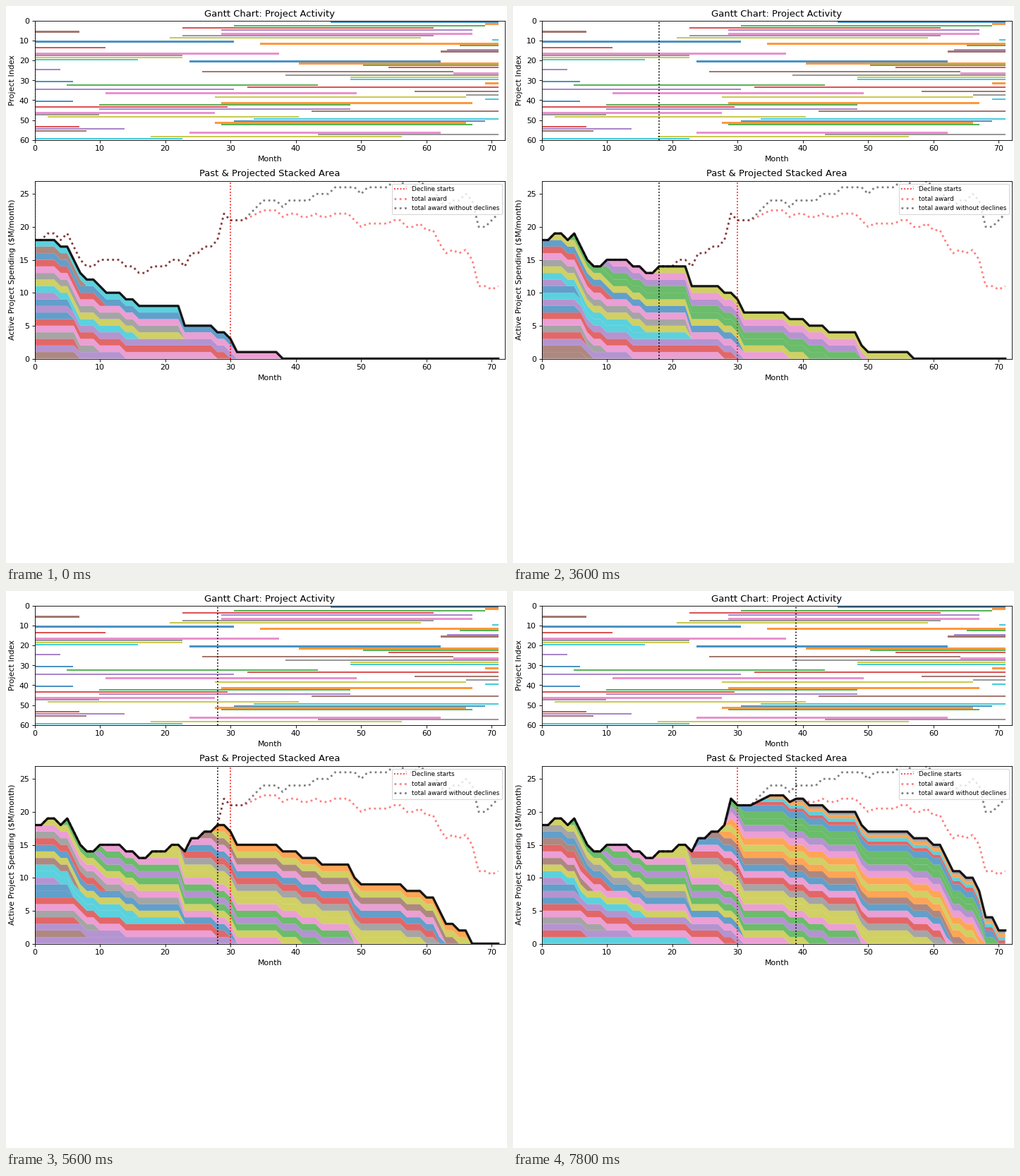
Write a matplotlib script that moves like this. It is 710 px wide and 789 px high and loops after 8 s.

```python
import numpy as np
import matplotlib.pyplot as plt
from matplotlib.animation import FuncAnimation

W, H, DPI = 710, 789, 78.9
MONTHS, SPAN, DECLINE = 72, 39, 30

# First month of each project; every project lasts SPAN months.
STARTS = [
    46, 70, 31, 23, 29, -32, 29, 23, 21, 71,
    -8, 35, 66, -28, 64, 63, -1, -16, -16, -23,
    24, 41, 51, 55, -35, 26, 65, 39, 49, 49,
    -33, 70, 5, 33, -8, 59, 11, 67, 28, 70,
    -33, 29, 10, -9, 10, 43, -11, -29, 2, 34,
    31, 28, 29, -32, -25, -31, 24, 44, 18, -16,
]
COLORS = [f"C{i % 10}" for i in range(len(STARTS))]
first = [max(s, 0) for s in STARTS]
months = np.arange(MONTHS)

active = np.array([(months >= s) & (months < s + SPAN) for s in STARTS], float)
weight = np.where(np.array(STARTS) > DECLINE + 1, 0.5, 1.0)
spending = active * weight[:, None]


def stack_order(ids):
    """Unstable median-of-three quicksort of project ids by first month."""
    a = list(ids)

    def key(i):
        return first[a[i]]

    def swap(i, j):
        a[i], a[j] = a[j], a[i]

    parts = [(0, len(a) - 1)]
    while parts:
        lo, hi = parts.pop()
        if hi - lo <= 16:
            a[lo:hi + 1] = sorted(a[lo:hi + 1], key=lambda p: first[p])
            continue
        mid = lo + (hi - lo) // 2
        if key(mid) < key(lo):
            swap(mid, lo)
        if key(hi) < key(mid):
            swap(hi, mid)
        if key(mid) < key(lo):
            swap(mid, lo)
        pivot = key(mid)
        i, j = lo, hi - 1
        swap(mid, j)
        while True:
            i += 1
            while key(i) < pivot:
                i += 1
            j -= 1
            while pivot < key(j):
                j -= 1
            if i >= j:
                break
            swap(i, j)
        swap(i, hi - 1)
        parts += [(lo, i - 1), (i + 1, hi)]
    return a


def add_axes(top, bottom, title, ylabel):
    left, width = 40.5, 666.3
    ax = fig.add_axes([left / W, 1 - bottom / H, width / W, (bottom - top) / H])
    ax.set_title(title)
    ax.set_xlabel("Month")
    ax.set_ylabel(ylabel)
    return ax


fig = plt.figure(figsize=(9, 10), dpi=DPI, facecolor="white")
gantt = add_axes(21.5, 189.5, "Gantt Chart: Project Activity", "Project Index")
area = add_axes(247.5, 499.5, "Past & Projected Stacked Area",
                "Active Project Spending ($M/month)")

scale = (MONTHS - 1) / MONTHS
for i, start in enumerate(STARTS):
    end = min(start + SPAN, MONTHS)
    gantt.barh(i, (end - first[i]) * scale, left=first[i] * scale, height=0.8,
               align="edge", color=COLORS[i], alpha=0.8)
gantt.set_xlim(0, MONTHS)
gantt.set_ylim(len(STARTS), 0)
gantt.set_yticks(range(0, 61, 10))

area.axvline(DECLINE, color="red", ls=":", lw=1.5, label="Decline starts")
award = dict(ls=":", lw=2.5, alpha=0.5)
area.plot(months, spending.sum(axis=0), color="red", label="total award", **award)
area.plot(months, active.sum(axis=0), color="black",
          label="total award without declines", **award)
total, = area.plot([], [], color="black", lw=3, alpha=0.9)
cursors = [ax.axvline(0, color="black", ls=":", lw=1.5) for ax in (gantt, area)]
area.legend(loc="upper right", fontsize=8)

layers = []


def update(now):
    while layers:
        layers.pop().remove()
    ids = stack_order(i for i, s in enumerate(first) if s <= now)
    layers.extend(area.stackplot(months, spending[ids], alpha=0.7,
                                 colors=[COLORS[i] for i in ids]))
    total.set_data(months, spending[ids].sum(axis=0))
    for line in cursors:
        line.set_xdata([now, now])
    area.set_xlim(0, MONTHS)
    area.set_ylim(0, 27)
    return [total, *cursors, *layers]


anim = FuncAnimation(fig, update, frames=40, interval=200, repeat=True,
                     repeat_delay=0, blit=False)
plt.show()
```
